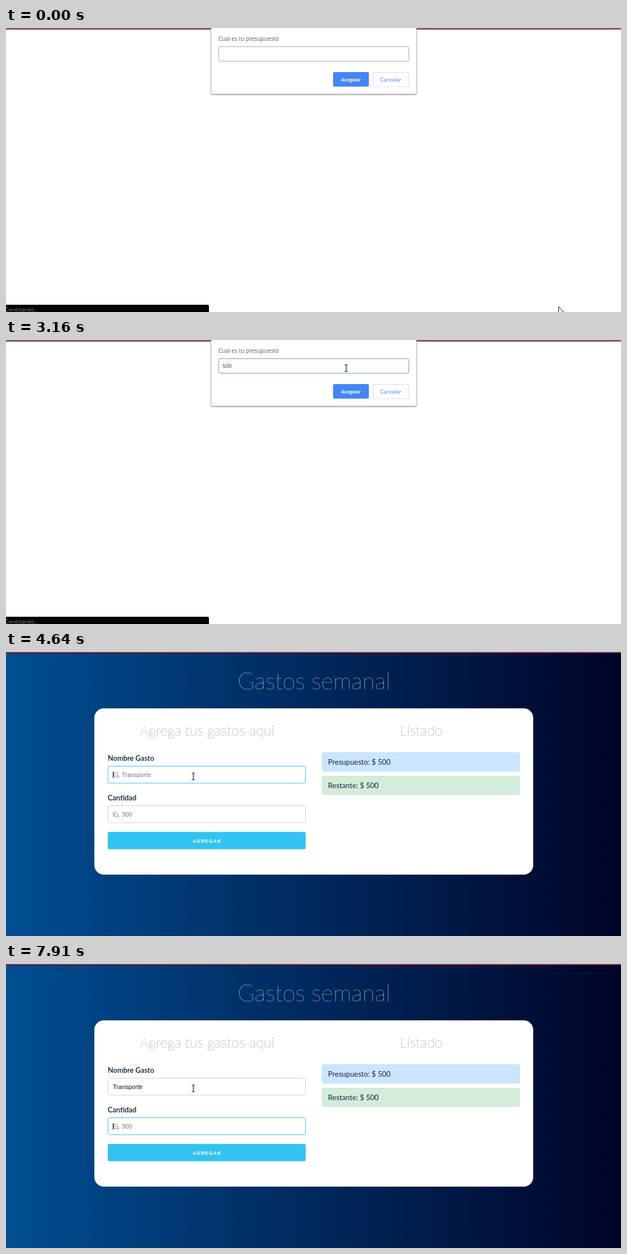
Recreate the animation shown at these times as an HTML page. Size 1100 px wide and 509 px high, loop 8 s.

```html
<!DOCTYPE html>
<html lang="es">
<head>
<meta charset="utf-8">
<title>Gastos semanal</title>
<style>
  html, body { margin: 0; width: 100%; height: 100%; overflow: hidden; background: #fff; }
  svg { display: block; width: 1100px; height: 509px; }
  text { white-space: pre; }
  .ui { font-family: "Open Sans", "Noto Sans", sans-serif; }
  .page { font-family: Lato, sans-serif; fill: #14263f; }
  .field { font-family: "Liberation Sans", Arial, sans-serif; font-size: 11px; }
  .mid { text-anchor: middle; }
  .thin { font-weight: 200; }
  .label { font-size: 12.9px; font-weight: 600; fill: #0b1c30; }
  .note { font-size: 13.1px; }
  .box { fill: #fff; stroke: #d1d1d1; }
  .hint { fill: #757575; }
  .caret { fill: #111; }
</style>
</head>
<body>
<svg viewBox="0 0 1100 509">
  <defs>
    <linearGradient id="night">
      <stop offset="0" stop-color="#004e92"/>
      <stop offset="1" stop-color="#000428"/>
    </linearGradient>
    <filter id="shadow" x="-5%" y="-10%" width="110%" height="125%">
      <feDropShadow dx="0" dy="1" stdDeviation="1.6" flood-color="#000" flood-opacity=".55"/>
    </filter>
  </defs>
  <rect width="1100" height="509" fill="#fff"/>

  <g id="page">
    <rect width="1100" height="509" fill="url(#night)"/>
    <rect x="158" y="101" width="785" height="298" rx="17" fill="#fff"/>
    <g class="page">
      <text class="mid thin" x="551" y="66.5" font-size="41.3" fill="#fff" style="fill:#fff">Gastos semanal</text>
      <text class="mid thin" x="359.5" y="150" font-size="25.2" style="fill:#174a78">Agrega tus gastos aqui</text>
      <text class="mid thin" x="742.5" y="150" font-size="25.2" style="fill:#174a78">Listado</text>
      <text class="label" x="182" y="194.5">Nombre Gasto</text>
      <text class="label" x="182" y="265.5">Cantidad</text>
      <rect x="565.5" y="180.5" width="353" height="33" rx="3" fill="#cce5ff" stroke="#b8daff"/>
      <rect x="565.5" y="222.5" width="353" height="33" rx="3" fill="#d4edda" stroke="#c3e6cb"/>
      <text class="note" x="576" y="202">Presupuesto: $ 500</text>
      <text class="note" x="576" y="243.5">Restante: $ 500</text>
    </g>
    <g class="field">
      <rect id="nameBox" class="box" x="182.5" y="204.5" width="353" height="30.5" rx="3"/>
      <text id="name" x="191.3" y="224"></text>
      <rect id="nameCaret" class="caret" y="214" width="1" height="12"/>
      <rect id="sumBox" class="box" x="182.5" y="275.5" width="353" height="30.5" rx="3"/>
      <text class="hint" x="191.3" y="295">Ej. 300</text>
      <rect id="sumCaret" class="caret" x="191" y="285" width="1" height="12"/>
      <rect x="182" y="322.5" width="354" height="31" rx="3" fill="#33c3f0"/>
      <text class="mid" x="359.5" y="342" fill="#fff" style="font-size:8.9px;font-weight:700;letter-spacing:.81px">AGREGAR</text>
    </g>
  </g>

  <rect width="1100" height="1.5" fill="#b8405c"/>
  <rect y="1.5" width="1100" height="1.2" fill="#2b1726"/>

  <g id="status" class="ui">
    <path d="M0 496H360q3 0 3 3V509H0Z"/>
    <text x="-1.5" y="508" font-size="9.2" fill="#8c8c8c">Conectando...</text>
  </g>

  <g id="dialog" class="ui">
    <path d="M367 -6H734V116q0 2-2 2H369q-2 0-2-2Z" fill="#fff" stroke="#aaa" stroke-width=".5" filter="url(#shadow)"/>
    <text x="380" y="23" font-size="10.1" fill="#55555f">Cual es tu presupuesto</text>
    <rect id="budgetBox" x="380.5" y="33.5" width="340" height="26" rx="2" fill="#fff"/>
    <text id="budget" x="387" y="50" font-size="9.7" fill="#333"></text>
    <rect id="budgetCaret" class="caret" y="39" width="1" height="13"/>
    <rect x="585" y="79" width="64" height="26" rx="2.5" fill="#4285f4"/>
    <text class="mid" x="617" y="95.5" font-size="9" font-weight="700" fill="#fff">Aceptar</text>
    <rect x="656.5" y="79.5" width="64" height="25.5" rx="2.5" fill="#fff" stroke="#dadce0"/>
    <text class="mid" x="688.3" y="95.5" font-size="9.4" fill="#3b78e7">Cancelar</text>
  </g>

  <g id="pointer">
    <path id="arrow" d="M.5 .5V13.6L3.4 10.9L5.4 15.2L7.5 14.3L5.6 10.2H9.6Z" fill="#fff" stroke="#111"/>
    <path id="beam" d="M-3 -6H-1L0 -5L1 -6H3M0 -5V5M-3 6H-1L0 5L1 6H3" fill="none" stroke="#222" stroke-width="1.2"/>
  </g>
</svg>
<script>
  const LOOP = 8000;
  const el = Object.fromEntries([...document.querySelectorAll('[id]')].map(e => [e.id, e]));
  const show = (e, on) => { e.style.display = on ? '' : 'none'; };
  const within = (t, a, b) => t >= a && t < b;
  const smooth = p => p * p * (3 - 2 * p);

  const budgetKeys = [2150, 2470, 2700];
  const nameKeys = [5590, 5820, 5890, 6200, 6370, 6520, 6670, 6750, 6900, 7060];
  const typed = (word, keys, t) => word.slice(0, keys.filter(k => t >= k).length);

  // Mouse moves: first step, last step, number of steps, start, end
  const moves = [
    [70, 850, 11, [988, 499], [607, 60]],
    [910, 1000, 2, [608, 60], [608.5, 50.5]],
    [3480, 3700, 4, [608.5, 50.5], [620, 94]],
    [4030, 4030, 1, [620, 94], [620, 96]],
    [4180, 4500, 5, [620, 96], [335, 223]],
  ];

  function pointerAt(t) {
    let at = moves[0][3];
    for (const [first, last, steps, from, to] of moves) {
      if (t < first) break;
      const gap = (last - first) / (steps - 1 || 1) || 1;
      const step = Math.min(steps, Math.floor((t - first) / gap + 1e-6) + 1);
      const p = smooth(step / steps);
      at = from.map((v, i) => v + (to[i] - v) * p);
    }
    return at;
  }

  function setText(text, value, caret, on) {
    if (text.textContent !== value) text.textContent = value;
    const end = value ? text.getComputedTextLength() : 0;
    caret.setAttribute('x', Math.round(+text.getAttribute('x') + end));
    show(caret, on);
  }

  function draw(t) {
    show(el.page, t >= 4030);
    show(el.status, t < 4180);
    show(el.dialog, t < 3940);
    el.dialog.style.opacity = t < 3870 ? 1 : 0.5;

    if (t < 3940) {
      el.budgetBox.style.stroke = t < 1080 ? '#aaa' : t < 1150 ? '#8ba4cc' : '#6c98dc';
      setText(el.budget, typed('500', budgetKeys, t), el.budgetCaret,
        within(t, 1080, 1620) || within(t, 2150, 3160) || within(t, 3480, 3870));
    }

    if (t >= 4030) {
      const name = typed('Transporte', nameKeys, t);
      el.nameBox.style.stroke = within(t, 4640, 7910) ? '#33c3f0' : '#d1d1d1';
      el.sumBox.style.stroke = t >= 7910 ? '#33c3f0' : '#d1d1d1';
      el.name.style.fill = name ? '#111' : '#757575';
      if (name) {
        setText(el.name, name, el.nameCaret, t < 7610);
      } else {
        setText(el.name, 'Ej. Transporte', el.nameCaret, within(t, 4640, 5190));
        el.nameCaret.setAttribute('x', 191);
      }
      show(el.sumCaret, t >= 7910);
    }

    const [x, y] = pointerAt(t);
    const overText = within(t, 910, 3560) || t >= 4500;
    show(el.beam, overText);
    show(el.arrow, !overText);
    el.pointer.setAttribute('transform', `translate(${x.toFixed(1)} ${y.toFixed(1)})`);
  }

  const start = performance.now();
  function tick() {
    draw((performance.now() - start) % LOOP);
    requestAnimationFrame(tick);
  }
  draw(0);
  requestAnimationFrame(tick);
</script>
</body>
</html>
```
